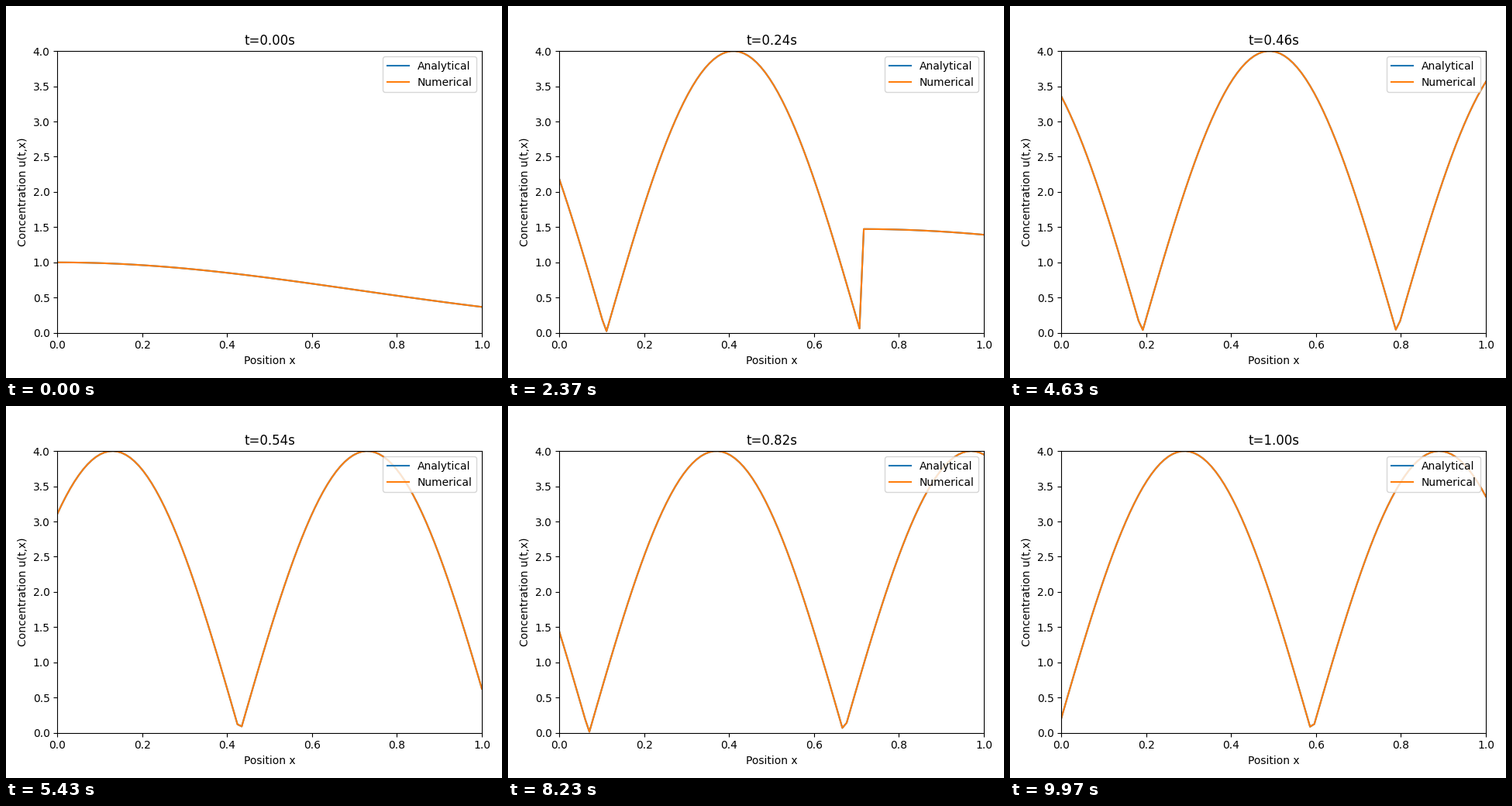
Recreate the animation shown at these times as a matplotlib script. Size 640 by 480 pixels, loop 10 s.

```python
import numpy as np
import matplotlib.pyplot as plt
from matplotlib.animation import FuncAnimation

STEPS = 300
TICKS = 400  # finer than STEPS, so each step shows on its rounded start time
LOOP_MS = 10000
SPEED = 3.0
SOURCE = 2.0

x = np.linspace(0, 1, 100)


def concentration(t):
    """Advected initial profile ahead of the front, inflow signal behind it."""
    ahead = np.exp(-(x - SPEED * t) ** 2) + SOURCE * t
    behind = 4 * np.abs(np.sin(5 * np.pi * (t - x / SPEED)))
    return np.where(x >= SPEED * t, ahead, behind)


fig, ax = plt.subplots(figsize=(6.4, 4.8), dpi=100)
lines = [ax.plot(x, concentration(0), label=name)[0]
         for name in ("Analytical", "Numerical")]
ax.set_xlim(0, 1)
ax.set_ylim(0, 4)
ax.set_xlabel("Position x")
ax.set_ylabel("Concentration u(t,x)")
title = ax.set_title("t=0.00s")
ax.legend(loc="upper right")
fig.tight_layout()
fig.subplots_adjust(top=0.8789)


def update(tick):
    step = (tick * STEPS + TICKS // 2) // TICKS
    t = step / STEPS
    u = concentration(t)
    for line in lines:
        line.set_ydata(u)
    title.set_text(f"t={t:.2f}s")
    return [*lines, title]


anim = FuncAnimation(fig, update, frames=TICKS, interval=LOOP_MS / TICKS,
                     repeat=True, repeat_delay=0, blit=False)
plt.show()
```
